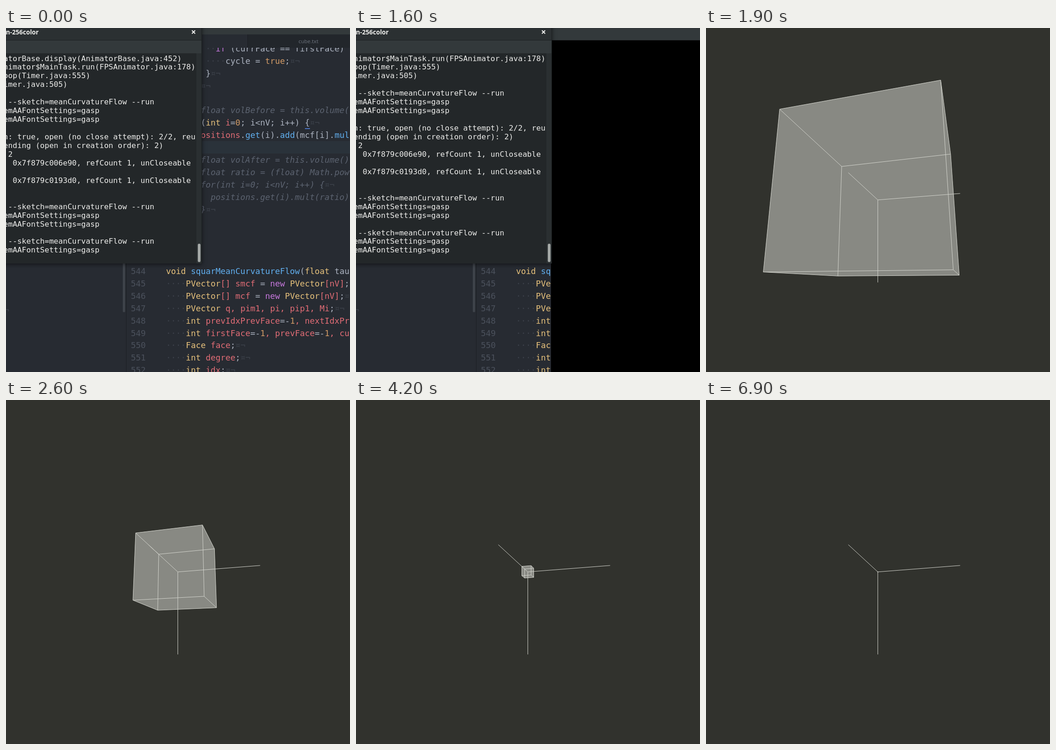
These frames come from a looping animation (748 px wide and 748 px high, 7.2 s). An HTML page with a canvas:

```html
<!DOCTYPE html>
<html lang="en">
<head>
<meta charset="utf-8">
<title>Mean curvature flow</title>
<style>
html, body { margin: 0; width: 100%; height: 100%; overflow: hidden; background: #31322d; }
canvas { display: block; width: 748px; height: 748px; }
</style>
</head>
<body>
<canvas id="stage" width="748" height="748"></canvas>
<script>
const ctx = document.getElementById("stage").getContext("2d");
const SIZE = 748, LOOP = 7200, STEP = 100;
const MONO = '"DejaVu Sans Mono", monospace';
const SANS = '"Noto Sans", "Open Sans", sans-serif';

function box(x, y, w, h, color) {
  ctx.fillStyle = color;
  ctx.fillRect(x, y, w, h);
}

function roundBox(x, y, w, h, r, color) {
  ctx.fillStyle = color;
  ctx.beginPath();
  ctx.roundRect(x, y, w, h, r);
  ctx.fill();
}

function text(str, x, y, font, color, align = "left") {
  ctx.font = font;
  ctx.fillStyle = color;
  ctx.textAlign = align;
  ctx.fillText(str, x, y);
}

// ---- Editor: "~k" switches the colour ----
const INK = {
  w: "#abb2bf", y: "#e5c07b", b: "#61afef", p: "#c678dd",
  r: "#e06c75", o: "#d19a66", c: "#5c6370", d: "#3d424b"
};
const CHAR = 10.776, ROW = 26.9, CODE_X = 348;
const rowY = n => 535 + (n - 544) * ROW;

// row, column, code
const CODE = [
  [526, 8, "~d··~pif ~w(currFace == firstFace)"],
  [527, 8, "~d····~wcycle = ~otrue~w;~d¤¬"],
  [528, 8, "~w}~d¤¬"],
  [529, 7, "~d¤¬"],
  [531, 7, "~cfloat volBefore = this.volume("],
  [532, 7, "~w(~yint ~ri~w=~o0~w; i<nV; i++) {~d¤¬"],
  [533, 6, "~rpositions~w.~bget~w(i).~badd~w(mcf[i].~bmul"],
  [535, 7, "~cfloat volAfter = this.volume()"],
  [536, 7, "~cfloat ratio = (float) Math.pow"],
  [537, 7, "~cfor(int i=0; i<nV; i++) {~d¤¬"],
  [538, 9, "~cpositions.get(i).mult(ratio)"],
  [539, 7, "~c}~d¤¬"],
  [544, 0, "~yvoid ~bsquarMeanCurvatureFlow~w(~yfloat ~wtau"],
  [545, 0, "~d····~yPVector~r[] smcf ~w= ~pnew ~yPVector~r[nV]~w;"],
  [546, 0, "~d····~yPVector~r[] mcf ~w= ~pnew ~yPVector~r[nV]~w;~d¤¬"],
  [547, 0, "~d····~yPVector ~rq, pim1, pi, pip1, Mi~w;~d¤¬"],
  [548, 0, "~d····~yint ~rprevIdxPrevFace~w=-~o1~r, nextIdxPr"],
  [549, 0, "~d····~yint ~rfirstFace~w=-~o1~r, prevFace~w=-~o1~r, cu"],
  [550, 0, "~d····~yFace ~rface~w;~d¤¬"],
  [551, 0, "~d····~yint ~rdegree~w;~d¤¬"],
  [552, 0, "~d····~yint ~ridx~w;~d¤¬"]
];

function codeLine(row, col, src) {
  let x = CODE_X + col * CHAR;
  for (const part of src.split("~").slice(1)) {
    const key = part[0], str = part.slice(1);
    const style = key === "c" ? "italic " : "";
    text(str, x, rowY(row), style + "17.9px " + MONO, INK[key]);
    x += str.length * CHAR;
  }
}

function editor() {
  box(0, 0, SIZE, SIZE, "#272b32");
  box(261, 246, 487, 27, "#2a323a");
  for (const line of CODE) codeLine(...line);
  box(650, 218, 11, 1.5, "#568af2");
  for (let n = 544; n < 553; n++) text(n, 271.5, rowY(n), "17.9px " + MONO, "#4b515c");
  box(426, 14, 100, 29, "#272b32");
  box(526, 14, 222, 29, "#22262b");
  box(525, 14, 1, 29, "#1a1d21");
  box(0, 0, SIZE, 14, "#33393b");
  text("cube.txt", 636, 33, "11.4px " + SANS, "#686e78");
  box(261, 500, 1, 248, "#1b1e23");
  roundBox(254, 490, 5, 128, 2.5, "#3e434a");
  text("¬", -4, 619, "17.9px " + MONO, INK.d);
}

// ---- Terminal ----
const RUN = " --sketch=meanCurvatureFlow --run", GASP = "emAAFontSettings=gasp";
const LOG = [
  "atorBase.display(AnimatorBase.java:452)",
  "nimator$MainTask.run(FPSAnimator.java:178)",
  "oop(Timer.java:555)",
  "imer.java:505)",
  "", RUN, GASP, GASP, "",
  "n: true, open (no close attempt): 2/2, reu",
  "ending (open in creation order): 2)",
  " 2",
  "  0x7f879c006e90, refCount 1, unCloseable",
  "",
  "  0x7f879c0193d0, refCount 1, unCloseable",
  "", "", RUN, GASP, GASP, "", RUN, GASP, GASP
];

function terminal(first) {
  ctx.save();
  ctx.shadowColor = "rgba(0,0,0,.55)";
  ctx.shadowBlur = 9;
  ctx.shadowOffsetY = 2;
  box(-20, -20, 446, 532, "#232729");
  ctx.restore();
  box(0, 0, 426, 27, "#2b3032");
  box(0, 26, 426, 1, "#1c2021");
  box(0, 27, 426, 28, "#33393b");
  box(414, 55, 11, 457, "#2a2f31");
  box(425, 0, 1, 512, "#1c2021");
  roundBox(417, 469, 6, 40, 3, "#a4a8a6");
  text("n-256color", 71, 13.5, "bold 13.7px " + SANS, "#eeeeec", "right");
  stroke([[404.3, 5.3], [411.3, 12.3]], "#f4f4f2", 2);
  stroke([[411.3, 5.3], [404.3, 12.3]], "#f4f4f2", 2);
  LOG.slice(first, first + 23).forEach((line, i) =>
    text(line, -5.4, 71.5 + i * 18.95, "16.51px " + MONO, "#eeeeec"));
}

// ---- Blank window and its notice ----
function blank(notice) {
  box(0, 0, SIZE, SIZE, "#cbccc7");
  box(0, 0, SIZE, 1, "#5d6264");
  box(0, 0, 1, SIZE, "#5d6264");
  if (!notice) return;
  roundBox(124, -20, 499.5, 71, 6, "#1d2123");
  roundBox(125, -20, 497.5, 70, 5, "#2d3234");
  ctx.fillStyle = "#000";
  ctx.beginPath();
  ctx.arc(167, 8, 28, 0, 7);
  ctx.fill();
  text("“meanCurvatureFlow” is ready", 212, 10, "14.5px Lato, sans-serif", "#bcbebc");
}

// ---- Cube in perspective, lengths relative to the camera distance ----
const FOCAL = 647.8, AXIS = 0.267, TILT = 0.2719, TURN = 0.2834;
// [step, log of half edge]
const SHRINK = [
  [19, -1.423], [23, -1.805], [26, -2.214], [31, -2.852], [39, -3.717],
  [42, -4.13], [47, -4.78], [55, -5.68], [72, -7.7]
];

function halfEdge(step) {
  const i = Math.max(1, SHRINK.findIndex(k => k[0] >= step));
  const [s0, v0] = SHRINK[i - 1], [s1, v1] = SHRINK[i];
  return Math.exp(v0 + (v1 - v0) * (step - s0) / (s1 - s0));
}

function project([x, y, z]) {
  const X = x * Math.cos(TURN) - z * Math.sin(TURN);
  const d = x * Math.sin(TURN) + z * Math.cos(TURN);
  const Y = y * Math.cos(TILT) - d * Math.sin(TILT);
  const Z = y * Math.sin(TILT) + d * Math.cos(TILT);
  const k = FOCAL / (1 - Z);
  return [373.6 + X * k, 373.8 + Y * k];
}

function trace(points) {
  ctx.beginPath();
  points.forEach(p => ctx.lineTo(p[0], p[1]));
}

function stroke(points, color, width = 1) {
  trace(points);
  ctx.strokeStyle = color;
  ctx.lineWidth = width;
  ctx.stroke();
}

function cube(step) {
  const h = halfEdge(step), line = "#d3d4cd";
  box(0, 0, SIZE, SIZE, "#31322d");
  const corners = [...Array(8).keys()].map(i =>
    project([1, 2, 4].map(bit => i & bit ? h : -h)));
  ctx.fillStyle = "#888983";
  for (const bit of [1, 2, 4]) {
    const [u, v] = [1, 2, 4].filter(b => b !== bit);
    for (const base of [0, bit]) {
      trace([base, base + u, base + u + v, base + v].map(i => corners[i]));
      ctx.fill();
    }
  }
  for (let i = 0; i < 8; i++)
    for (const bit of [1, 2, 4])
      if (!(i & bit)) stroke([corners[i], corners[i | bit]], line);
  const origin = project([0, 0, 0]);
  for (const tip of [[AXIS, 0, 0], [0, AXIS, 0], [0, 0, AXIS]])
    stroke([origin, project(tip)], line);
}

function draw(step) {
  if (step >= 19) return cube(step);
  if (step >= 17) return blank(step === 18);
  editor();
  if (step === 16) {
    box(424, 0, 324, 27, "#33393b");
    box(424, 26, 324, 1, "#25292b");
    box(424, 27, 324, 721, "#000");
  }
  terminal(step < 10 ? 0 : 1);
}

const start = performance.now();
let shown = -1;
function tick() {
  const step = Math.floor((performance.now() - start) % LOOP / STEP);
  if (step !== shown) draw(shown = step);
  requestAnimationFrame(tick);
}
tick();
</script>
</body>
</html>
```
